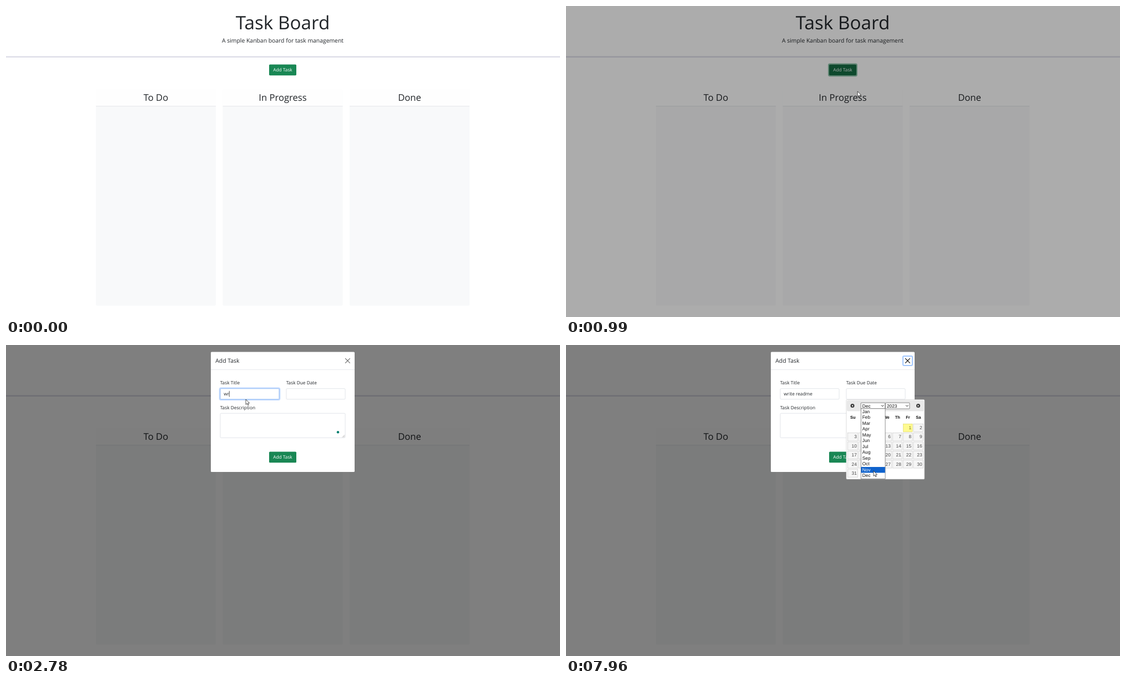
An HTML page that plays this animation: 998 by 561 pixels, repeating every 8 s.

```html
<!DOCTYPE html>
<html lang="en">
<head>
<meta charset="utf-8">
<title>Task Board</title>
<style>
  html, body { margin: 0; width: 100%; height: 100%; overflow: hidden; background: #fff; }
  svg { display: block; width: 998px; height: 561px; }
  text { font-family: "Open Sans", sans-serif; fill: #212529; text-rendering: geometricPrecision; white-space: pre; }
  .ui text { font-family: "Liberation Sans", Arial, sans-serif; font-size: 8.3px; fill: #111; }
</style>
</head>
<body>
<script>
const LOOP = 8000;
const NS = "http://www.w3.org/2000/svg";

function el(parent, tag, attrs = {}, content) {
  const node = document.createElementNS(NS, tag);
  for (const key in attrs) node.setAttribute(key, attrs[key]);
  if (content !== undefined) node.textContent = content;
  parent.appendChild(node);
  return node;
}
const group = (parent, attrs) => el(parent, "g", attrs);
const rect = (parent, x, y, width, height, fill, more) =>
  el(parent, "rect", { x, y, width, height, fill, ...more });
const box = (parent, x, y, w, h, fill, stroke, rx = 0) =>
  rect(parent, x + 0.25, y + 0.25, w - 0.5, h - 0.5, fill, { stroke, "stroke-width": 0.6, rx });
const path = (parent, d, attrs) => el(parent, "path", { d, fill: "none", ...attrs });
const text = (parent, x, y, size, str, more) =>
  el(parent, "text", { x, y, "font-size": size, ...more }, str);
const MID = { "text-anchor": "middle" };

function focusRing(parent, x, y, w, h) {
  const g = group(parent, { opacity: 0 });
  rect(g, x - 1, y - 1, w + 2, h + 2, "none",
    { stroke: "#0d6efd", "stroke-opacity": 0.25, "stroke-width": 2, rx: 2.5 });
  rect(g, x + 0.3, y + 0.3, w - 0.6, h - 0.6, "none",
    { stroke: "#86b7fe", "stroke-width": 0.7, rx: 1.5 });
  return g;
}

function button(parent, y) {
  const face = rect(parent, 474, y, 49, 19.7, "#198754", { rx: 1.6 });
  text(parent, 498.5, y + 12.8, 8.31, "Add Task", { ...MID, style: "fill:#fff" });
  return face;
}

const svg = el(document.body, "svg", { viewBox: "0 0 998 561" });

// Board
const board = group(svg);
rect(board, 0, 0, 998, 561, "#fff");
text(board, 498.5, 42, 33.24, "Task Board", MID);
text(board, 498.5, 65.5, 10.39, "A simple Kanban board for task management", MID);
rect(board, 0, 90.5, 998, 2.4, "#dddde8");
const addRing = rect(board, 473, 104.4, 51, 21.8, "none",
  { stroke: "#198754", "stroke-opacity": 0.5, "stroke-width": 2, rx: 2.4 });
const addFace = button(board, 105.5);
["To Do", "In Progress", "Done"].forEach((name, i) => {
  const x = 162 + i * 228.5;
  rect(board, x, 151, 216, 389.5, "#f8f9fa", { rx: 2 });
  rect(board, x, 150.5, 216, 30, "#fefefe");
  rect(board, x, 180.4, 216, 0.8, "#dfe2e6");
  text(board, x + 108, 171, 16.62, name, MID);
});
const shade = rect(svg, 0, 0, 998, 561, "#000");

// Dialog
const modal = group(svg);
rect(modal, 369, 12.5, 259, 216.5, "#fff", { rx: 1.6 });
text(modal, 377.3, 32, 10.39, "Add Task");
rect(modal, 369, 44.2, 259, 0.7, "#dee2e6");
const cross = path(modal, "M611.4 24.4l8 8m0-8l-8 8",
  { stroke: "#000", "stroke-width": 1.1, "stroke-linecap": "round" });
const closeRing = rect(modal, 607, 20, 17, 17, "none",
  { stroke: "#0d6efd", "stroke-opacity": 0.38, "stroke-width": 2, rx: 2 });

const BORDER = "#ced4da";
text(modal, 385.7, 71.2, 8.31, "Task Title");
text(modal, 504.7, 71.2, 8.31, "Task Due Date");
text(modal, 385.7, 115.7, 8.31, "Task Description");
box(modal, 385.7, 78.4, 106.6, 19.7, "#fff", BORDER, 1.6);
box(modal, 504.7, 78.4, 106.6, 19.7, "#fff", BORDER, 1.6);
box(modal, 385.7, 123, 225.6, 44.6, "#fff", BORDER, 1.6);
path(modal, "M606 166.5l4-4m-1.8 4l1.8-1.8", { stroke: "#777", "stroke-width": 0.6 });
const titleRing = focusRing(modal, 385.7, 78.4, 106.6, 19.7);
const dateRing = focusRing(modal, 504.7, 78.4, 106.6, 19.7);
const entry = text(modal, 392.3, 91.4, 8.31, "");
const titleCaret = rect(modal, 392, 82.8, 0.7, 10.8, "#111");
const dateCaret = rect(modal, 511.4, 82.8, 0.7, 10.8, "#111");
const dot = el(modal, "circle", { cx: 598, cy: 157.3, r: 2.2, fill: "#027e6f" });
button(modal, 192.6);

// Calendar
const calendar = group(svg, { class: "ui" });
box(calendar, 504.7, 98.3, 141.3, 144, "#fff", "#c5c5c5", 1.5);
box(calendar, 506.3, 100, 138, 19.2, "#e9e9e9", "#dddddd", 1.5);
[[516, -1], [634.5, 1]].forEach(([x, dir]) => {
  el(calendar, "circle", { cx: x, cy: 109.6, r: 3.5, fill: "#3a3a3a" });
  path(calendar, `M${x - dir} 107.8l${dir * 2.4} 1.8l${-dir * 2.4} 1.8z`, { fill: "#fff" });
});
function select(x, label) {
  box(calendar, x, 104, 44, 11.3, "#fff", "#444", 0.8);
  text(calendar, x + 2.8, 112.6, 8.31, label);
  path(calendar, `M${x + 37} 108.6l2.2 2.2l2.2 -2.2`, { stroke: "#111", "stroke-width": 1 });
}
select(531, "Dec");
select(575.2, "2023");

const COLS = [
  ["Su", 507, 526], ["Mo", 527.4, 547], ["Tu", 548.2, 565.6], ["We", 567, 587],
  ["Th", 588.3, 606], ["Fr", 607.3, 624.3], ["Sa", 625.6, 643.7]
];
COLS.forEach(([name, a, b]) =>
  text(calendar, (a + b) / 2 + 0.2, 132.6, 7.5, name,
    { ...MID, style: "font-weight:700;font-size:7.5px" }));
for (let day = 1; day <= 31; day++) {
  const slot = day + 4, [, a, b] = COLS[slot % 7];
  const y = 142 + Math.floor(slot / 7) * 16.35;
  const today = day === 1;
  box(calendar, a, y, b - a, 14.9, today ? "#fffa90" : "#f6f6f6", today ? "#dad55e" : "#c5c5c5");
  text(calendar, b - 2.2, y + 10.1, 8.31, day,
    { "text-anchor": "end", style: `fill:${today ? "#777620" : "#454545"}` });
}

// Month list
const ROW = 10.5, LIST_TOP = 114.6;
const list = group(svg, { class: "ui" });
box(list, 531, LIST_TOP, 44.3, 127.3, "#fff", "#444");
const bar = rect(list, 531.5, 0, 43.3, ROW, "#0f62cc");
const months = "Jan Feb Mar Apr May Jun Jul Aug Sep Oct Nov Dec".split(" ")
  .map((name, i) => text(list, 533.8, LIST_TOP + i * ROW + 8.1, 8.31, name));

const arrow = path(svg, "M0 0V9.4L2.2 7.4L3.7 10.8L5.2 10.1L3.7 6.9H6.6Z",
  { fill: "#fff", stroke: "#111", "stroke-width": 0.7, "stroke-linejoin": "round" });

// Pointer stops: time, x, y
const STOPS = [
  [70, 894, 371], [330, 740, 268], [600, 570, 152], [790, 516, 119], [920, 515, 118],
  [990, 525, 152], [1090, 529, 184], [1340, 529, 189], [1680, 485, 136],
  [2000, 440, 100], [2300, 432, 98], [5400, 432, 98], [5820, 622, 150], [6030, 622, 150],
  [6500, 537, 111], [6570, 535, 110], [6850, 514, 109], [7060, 563, 110],
  [7400, 563, 110], [7880, 555, 225], [7960, 554, 227], [8000, 554, 227]
];
const TYPED = "write readme";
const KEYS = [2650, 2780, 3110, 3180, 3380, 3450, 3980, 4050, 4250, 4450, 4650, 4730];

const clamp = v => Math.max(0, Math.min(1, v));
const ramp = (t, start, length) => clamp((t - start) / length);
const between = (t, a, b) => t >= a && t < b;
const show = (node, on) => node.setAttribute("visibility", on ? "visible" : "hidden");
const fade = (node, v) => node.setAttribute("opacity", v);
const tick = t => Math.floor((t + 12) / 66.4) * 66.4;

function pointer(t) {
  let i = 0;
  while (i < STOPS.length - 2 && t >= STOPS[i + 1][0]) i++;
  const [t0, x0, y0] = STOPS[i], [t1, x1, y1] = STOPS[i + 1];
  const p = ramp(t, t0, t1 - t0);
  return [x0 + (x1 - x0) * p, y0 + (y1 - y0) * p];
}

function render(now) {
  const t = now, q = tick(now);

  addFace.setAttribute("fill", t >= 920 ? "#146c43" : t >= 790 ? "#157347" : "#198754");
  show(addRing, t >= 920);
  fade(shade, 0.5 * ramp(q, 893, 159));

  const slide = ramp(q, 1050, 270);
  fade(modal, ramp(q, 1050, 150));
  modal.setAttribute("transform", `translate(0 ${-26 * (1 - slide) ** 2})`);
  show(dot, t >= 1550);

  const typed = TYPED.slice(0, KEYS.filter(k => t >= k).length);
  if (entry.textContent !== typed) entry.textContent = typed;
  fade(titleRing, ramp(q, 2080, 150) * (1 - ramp(q, 5000, 150)));
  show(titleCaret, between(t, 2150, 5060));
  titleCaret.setAttribute("x", 392 + (typed ? entry.getComputedTextLength() : 0));

  fade(dateRing, ramp(q, 5000, 150) * (t < 7260 ? 1 : 0));
  show(dateCaret, between(t, 5060, 5600) || between(t, 6090, 6640));
  fade(calendar, ramp(q, 5040, 200));

  const open = t >= 7260;
  show(closeRing, open);
  cross.setAttribute("stroke-opacity", open ? 1 : 0.6);

  const [x, y] = pointer(q);
  show(arrow, t >= 70);
  arrow.setAttribute("transform", `translate(${x} ${y})`);

  show(list, open);
  const row = y < LIST_TOP ? 11 : Math.min(11, Math.floor((y - LIST_TOP) / ROW));
  bar.setAttribute("y", LIST_TOP + 0.4 + row * ROW);
  months.forEach((m, i) => { m.style.fill = i === row ? "#fff" : "#111"; });
}

const begin = performance.now();
function loop() {
  render((performance.now() - begin) % LOOP);
  requestAnimationFrame(loop);
}
loop();
</script>
</body>
</html>
```
